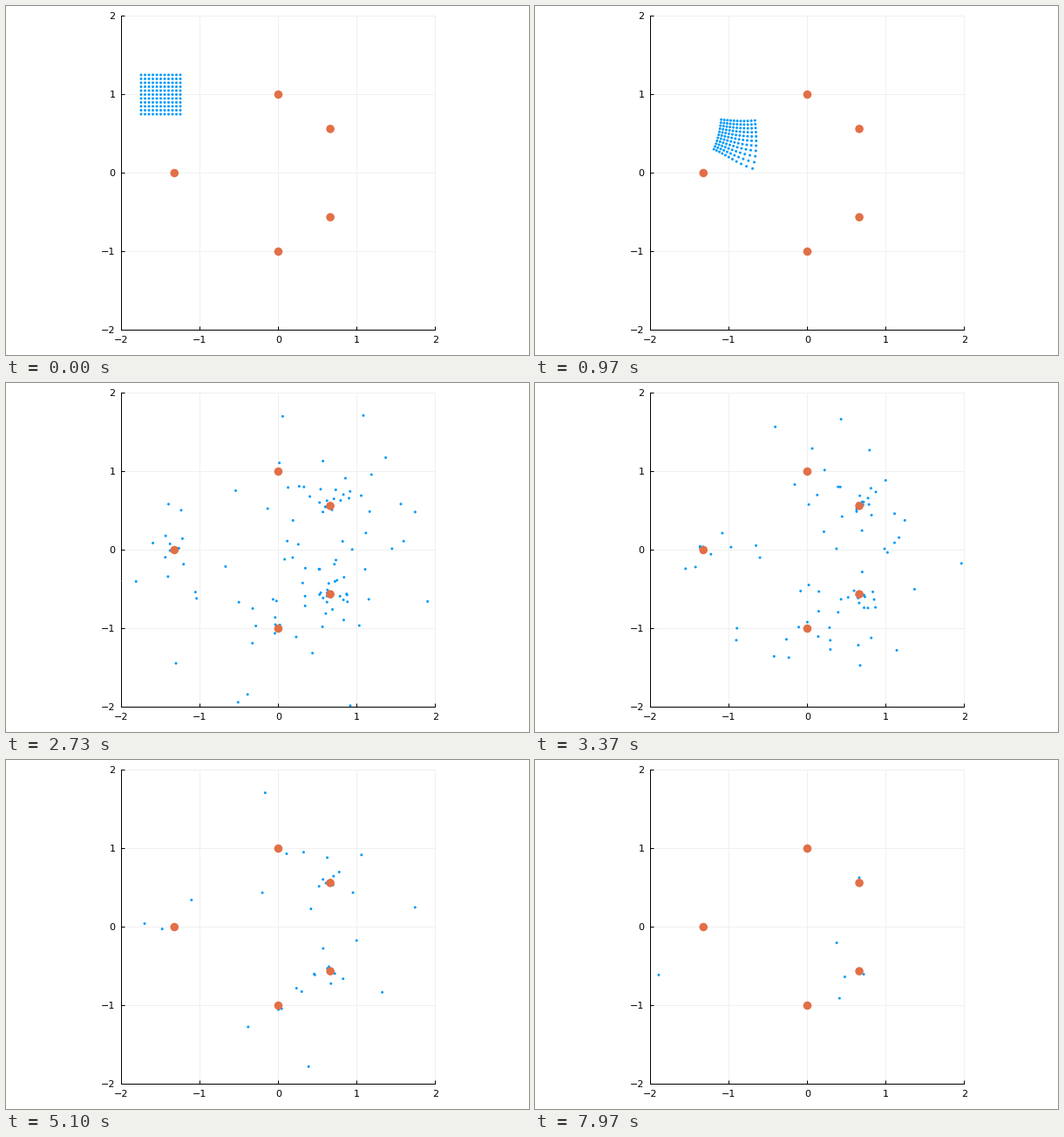
Recreate the animation shown at these times as a matplotlib script. Size 600 by 400 pixels, loop 8000 ms.

```python
import numpy as np
import matplotlib.pyplot as plt
from matplotlib.animation import FuncAnimation

# Newton's method on z^5 + z^2 - z + 1, started from a small grid of points
POLY = np.array([1, 0, 0, 1, -1, 1])
DERIV = np.polyder(POLY)
STEPS = 16
PER_STEP = 15
FPS = 30
LOOP_MS = 8000
TICK_MS = 20  # finer than the motion's rate, so poses change on 10 ms marks
PX = 0.72  # points per pixel at 100 dpi


def newton(z):
    return z - np.polyval(POLY, z) / np.polyval(DERIV, z)


def xy(z):
    return np.column_stack([z.real, z.imag])


def dots(z, diameter, color, zorder):
    return ax.scatter(z.real, z.imag, s=(diameter * PX) ** 2, c=color,
                      edgecolors="none", linewidths=0, zorder=zorder)


re, im = np.meshgrid(np.linspace(-1.75, -1.25, 11), np.linspace(0.75, 1.25, 11))
path = [(re + 1j * im).ravel()]
for _ in range(STEPS):
    path.append(newton(path[-1]))

plt.rcParams["font.family"] = "DejaVu Sans"
fig = plt.figure(figsize=(6, 4), dpi=100, facecolor="white")
# just short of half pixels, so lines snap to the pixel they lie in
ax = fig.add_axes([132.49 / 600, 28.51 / 400, 360 / 600, 360 / 400])
ax.set(xlim=(-2, 2), ylim=(-2, 2), xticks=range(-2, 3), yticks=range(-2, 3))
ax.set_axisbelow(True)
ax.grid(color="#f0f0f0", linewidth=PX, clip_on=False)
ax.tick_params(direction="in", length=4 * PX, width=PX, pad=5, labelsize=8)
ax.spines[["top", "right"]].set_visible(False)
ax.spines[["left", "bottom"]].set_linewidth(PX)

points = dots(path[0], 3.0, "#009afa", 3)
dots(np.roots(POLY), 9.6, "#e26f46", 4)


def update(tick):
    pose = int((tick * TICK_MS + 15) * FPS / 1000)
    step, i = divmod(pose, PER_STEP)
    ease = (1 - np.cos(np.pi * i / (PER_STEP - 1))) / 2
    start, end = path[step], path[step + 1]
    points.set_offsets(xy(start + (end - start) * ease))
    return (points,)


anim = FuncAnimation(fig, update, frames=LOOP_MS // TICK_MS, interval=TICK_MS,
                     repeat=True, repeat_delay=0)
plt.show()
```
